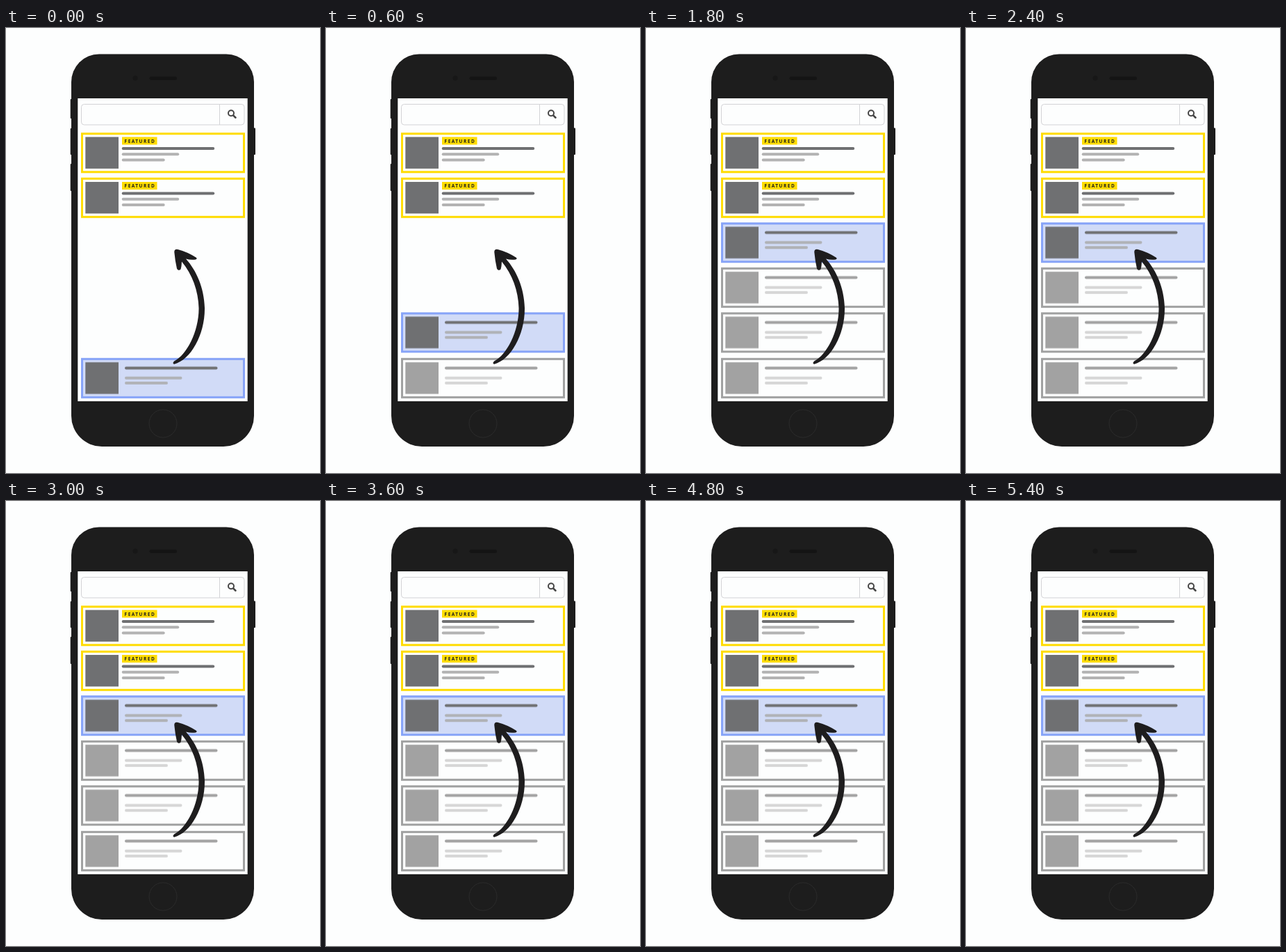
These frames come from a looping animation (452 px wide and 639 px high, 6 s). An HTML page:

```html
<!DOCTYPE html>
<html lang="en">
<head>
<meta charset="utf-8">
<title>Listing moves up</title>
<style>
  html, body { margin: 0; width: 100%; height: 100%; overflow: hidden; background: #fdfefe; }
  svg { display: block; width: 452px; height: 639px; }
  .frame { fill: var(--fill, #fdfefe); stroke: var(--edge); stroke-width: 3; }
  .thumb, .title { fill: var(--dark); }
  .line { fill: var(--light); }
  .featured { --edge: #ffdc00; --dark: #6f7072; --light: #b3b3b3; }
  .active {
    --fill: #d1dbf7; --edge: #87a4f8; --dark: #6f7072; --light: #b0b2b6;
    animation: climb 6s step-end infinite;
  }
  .plain { --edge: #a0a1a1; --dark: #a2a2a2; --light: #d6d6d6; }
  .tag { font: 700 6.5px "Open Sans", sans-serif; letter-spacing: 1.5px; fill: #1c1c1c; }
  .last { animation: showLast 6s step-end infinite; }
  .middle { animation: showMiddle 6s step-end infinite; }
  .first { animation: showFirst 6s step-end infinite; }
  @keyframes climb {
    0% { transform: translateY(473.8px); }
    10% { transform: translateY(408.3px); }
    20% { transform: translateY(343.8px); }
    30%, 100% { transform: translateY(279.2px); }
  }
  @keyframes showLast { 0% { opacity: 0; } 10%, 100% { opacity: 1; } }
  @keyframes showMiddle { 0% { opacity: 0; } 20%, 100% { opacity: 1; } }
  @keyframes showFirst { 0% { opacity: 0; } 30%, 100% { opacity: 1; } }
</style>
</head>
<body>
<svg viewBox="0 0 452 639">
  <defs>
    <g id="card">
      <rect class="frame" x="109.5" y="1.5" width="233" height="55"/>
      <rect class="thumb" x="114.3" y="6.2" width="47.7" height="45.4"/>
    </g>
    <g id="listing">
      <use href="#card"/>
      <rect class="title" x="171" y="12.5" width="133.5" height="4" rx="2"/>
      <rect class="line" x="171" y="26.7" width="82.5" height="4" rx="2"/>
      <rect class="line" x="171" y="34.1" width="62" height="4" rx="2"/>
    </g>
    <g id="promo">
      <use href="#card"/>
      <rect x="167" y="6.2" width="50.5" height="11" fill="#ffdc00"/>
      <text class="tag" x="170.6" y="14.4">FEATURED</text>
      <rect class="title" x="166.7" y="20.8" width="133.5" height="4" rx="2"/>
      <rect class="line" x="166.7" y="29" width="82.5" height="4" rx="2"/>
      <rect class="line" x="166.7" y="37.2" width="62" height="4" rx="2"/>
    </g>
  </defs>

  <!-- phone -->
  <g fill="#1d1d1d">
    <rect x="92.7" y="102" width="4" height="28" rx="1"/>
    <rect x="92.7" y="144" width="4" height="38" rx="1"/>
    <rect x="92.7" y="195" width="4" height="39" rx="1"/>
    <rect x="354" y="143.5" width="5" height="38.5" rx="1"/>
    <path d="M134 37.5H317A40 40 0 0 1 357 77.5V557A44 44 0 0 1 313 601H138A44 44 0 0 1 94 557V77.5A40 40 0 0 1 134 37.5Z"/>
  </g>
  <circle cx="186" cy="72" r="3.5" fill="#171717"/>
  <rect x="206.5" y="69.8" width="39.5" height="5" rx="2.5" fill="#141414"/>
  <circle cx="226" cy="568" r="20" fill="none" stroke="#2b2b2b"/>
  <rect x="103.3" y="101" width="244.4" height="435" fill="#fdfefe"/>

  <!-- search bar -->
  <g fill="none" stroke="#d3d3d6">
    <rect x="108.5" y="109.5" width="234.5" height="29.5" rx="4"/>
    <path d="M307.5 109.5V139"/>
  </g>
  <g fill="none" stroke="#454545" stroke-linecap="round">
    <circle cx="324" cy="122.3" r="4" stroke-width="2"/>
    <path d="M327.3 125.6L330.5 128.7" stroke-width="2.6"/>
  </g>

  <use class="featured" href="#promo" y="150.3"/>
  <use class="featured" href="#promo" y="214.8"/>
  <use class="plain first" href="#listing" y="343.8"/>
  <use class="plain middle" href="#listing" y="408.3"/>
  <use class="plain last" href="#listing" y="473.8"/>
  <g class="active"><use href="#listing"/></g>

  <path fill="#1e1d1e" d="M242 482.7C266 477 286.5 440 286 402C285.2 373 274 348 259 331.5
    Q266 333.4 273 332.4Q276 331.2 273.5 329.5Q261 321.5 247.5 318Q242 317 242.3 322
    Q243.5 335 246 345.5Q248 349.5 251.5 346.5Q252.8 342 253 335.5
    C268 353 277 378 277.5 402C278 435 260 470 242 478.5Q239 481.5 242 482.7Z"/>
</svg>
</body>
</html>
```
